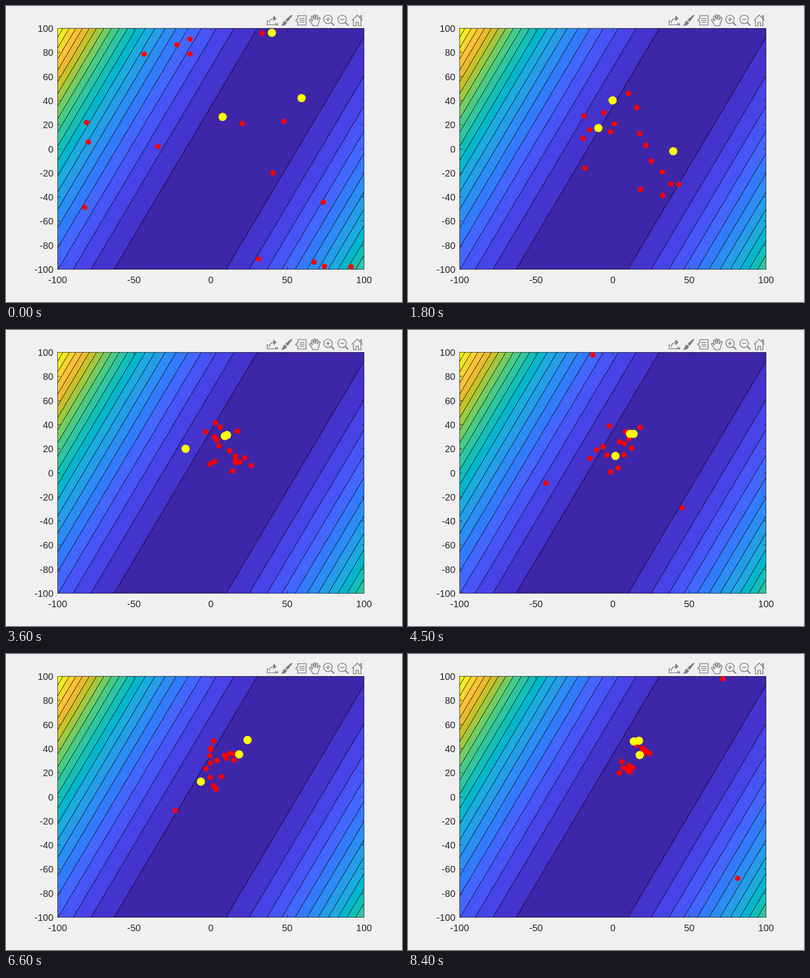
Recreate the animation shown at these times as an HTML page. Size 840 by 630 pixels, loop 8.7 s.

```html
<!DOCTYPE html>
<html lang="en">
<head>
<meta charset="utf-8">
<title>Swarm on a contour plot</title>
<style>
html, body { margin: 0; width: 100%; height: 100%; overflow: hidden; background: #f0f0f0; }
svg { display: block; width: 840px; height: 630px; }
text { font: 20px "Liberation Sans", Arial, sans-serif; fill: #262626; }
</style>
</head>
<body>
<svg id="stage" viewBox="0 0 840 630" xmlns="http://www.w3.org/2000/svg">
  <defs><clipPath id="plot"><rect x="109" y="47" width="651" height="514"/></clipPath></defs>
  <rect width="840" height="630" fill="#f0f0f0"/>
  <g id="bands" clip-path="url(#plot)" stroke="#000" stroke-width="1"></g>
  <g id="axes" fill="none" stroke="#262626" stroke-width="1"></g>
  <g id="labels"></g>
  <g id="tools" fill="none" stroke="#808080" stroke-width="1.7">
    <path d="M557 31.500H554V40H572V35.500M558.500 36C559 30 563 26.500 570 26.500"/>
    <path d="M567 20L574 26.500L567 32.500ZM571 41H577V35.500Z" fill="#808080" stroke="none"/>
    <path d="M605.500 18.500L607.500 20.500L597.500 34L592.500 29.500ZM591 31L596 35.500C595 40 590 42.500 583.500 42C587 39 587 33 591 31Z" fill="#808080" stroke="none"/>
    <path d="M619 20.500H636.500V40.500H619V34L614.500 30.500L619 27ZM622.500 26.500H633M622.500 30.500H633M622.500 34.500H633"/>
    <path d="M651 42C649 37.500 646 34 644 31C643 28.500 646 27.500 647.500 29.500L650 32.500L648 23C648 20.500 651 20.500 651.500 23L653 29V20.500C653 18 656 18 656 20.500V29L658 21C658.500 19 661.500 19.500 661 22L660 30L663 25C664.500 23 667 24.500 666 27L663 36L661.500 42Z"/>
    <g id="lens"><circle cx="683" cy="28.500" r="9"/><path d="M689.500 35L696 41.500" stroke-width="2.500"/><path d="M678.500 28.500H687.500"/></g>
    <path d="M683 24V33"/>
    <use href="#lens" x="30"/>
    <path d="M733.500 31L745 19.500L756.500 31M737 28.500V42H742.500V34.500H747.500V42H753V28.500M751.500 25.500V20.500H754V28"/>
  </g>
  <g id="dots"></g>
</svg>
<script>
const NS = "http://www.w3.org/2000/svg";
const STEP = 300, COUNT = 29, LAST = COUNT - 1;

function add(parent, tag, attrs, text) {
  const el = document.createElementNS(NS, tag);
  for (const k in attrs) el.setAttribute(k, attrs[k]);
  if (text !== undefined) el.textContent = text;
  document.getElementById(parent).appendChild(el);
  return el;
}

// Quadratic valley: each level lies at a distance proportional to sqrt(level)
const palette = ("#3e26a8 #4433cc #4743e7 #4755f6 #4367fd #347afd #2d8cf3 #259ce7 #1caadf #05b6ce #12beb9 " +
  "#2fc5a2 #48cb86 #71cd64 #9fc942 #c8c129 #eaba31 #fec13a #fad42e #f5e825 #f9fb15").split(" ");
const TOP = 652, LOW = 347.7;
for (let k = palette.length - 1; k >= 0; k--) {
  const half = 118.7 * Math.sqrt(k + 1);
  add("bands", "path", {
    d: `M${TOP - half} 47H${TOP + half}L${LOW + half} 561H${LOW - half}Z`,
    fill: palette[k]
  });
}

// Axes
const crisp = v => Math.floor(v) + 0.5;
add("axes", "rect", { x: 109.5, y: 47.5, width: 650, height: 513 });
for (let x = -100; x <= 100; x += 50) {
  const p = crisp(434 + 3.25 * x);
  add("axes", "path", { d: `M${p} 561v-6.500M${p} 47v6.500` });
  add("labels", "text", { x: p, y: 590, "text-anchor": "middle" }, x);
}
for (let y = -100; y <= 100; y += 20) {
  const p = crisp(304 - 2.565 * y);
  add("axes", "path", { d: `M109 ${p}h6.500M760 ${p}h-6.500` });
  add("labels", "text", { x: 100.5, y: p + 7.5, "text-anchor": "end" }, y);
}

// Key points of the three leaders: step, then x, y pairs
const keys = [
  [0, 564, 57, 627, 196, 459.5, 236],
  [4, 409, 175, 643, 357, 457, 244],
  [9, 443, 249.5, 464, 255.5, 313, 251],
  [15, 471, 221, 478.5, 221, 440, 268],
  [19, 488.5, 196.5, 506, 230.5, 395, 296],
  [24, 507.5, 161.5, 498, 211, 404.5, 259.5],
  [28, 490, 184.5, 491.5, 215, 479, 186]
];

// Where the followers begin
const start = [
  [543.5, 58], [390, 70.5], [362.5, 82.5], [390.5, 102], [293, 102.5], [171, 248],
  [174.5, 289.5], [322, 299], [501, 250], [589.5, 245.5], [566, 355.5], [167, 428.5],
  [673, 417.5], [535.5, 538.5], [653.5, 545], [675.5, 554], [732, 555.5]
];

// Seeded value in -1..1
function noise(n) {
  const s = Math.sin(n * 127.1 + 11.7) * 43758.5453;
  return 2 * (s - Math.floor(s)) - 1;
}

const clamp = (v, lo, hi) => Math.min(hi, Math.max(lo, v));

function leader(n, step) {
  let i = 0;
  while (i < keys.length - 2 && keys[i + 1][0] <= step) i++;
  const a = keys[i], b = keys[i + 1];
  const u = (step - a[0]) / (b[0] - a[0]);
  const wander = 14 * Math.sin(Math.PI * u);
  const at = j => a[j] + (b[j] - a[j]) * u + wander * noise(step * 61 + j);
  return [at(2 * n + 1), at(2 * n + 2)];
}

// Followers close in on a drifting centre, scatter along the valley, and now and then scout far off
function follower(n, step) {
  const u = step / LAST, seed = step * 97 + n * 5;
  const cx = 475 - 35 * Math.sin(Math.PI * u * u), cy = 283 - 56 * u;
  const pull = Math.exp(-step / 6), settle = 1 - pull;
  const scout = step > 3 && noise(seed) > 0.86;
  const wide = scout ? 260 : 0, size = 70 - 30 * u;
  const along = size * noise(seed + 1), across = 0.65 * size * noise(seed + 2);
  const dx = 0.51 * along + 0.86 * across + wide * noise(seed + 3);
  const dy = 0.51 * across - 0.86 * along + wide * noise(seed + 4);
  const [sx, sy] = start[n];
  return [
    clamp(cx + (sx - cx) * pull + dx * settle, 115, 754),
    clamp(cy + (sy - cy) * pull + dy * settle, 53, 555)
  ];
}

const red = start.map(() => add("dots", "circle", { r: 5.8, fill: "#f00" }));
const yellow = [0, 1, 2].map(() => add("dots", "circle", { r: 8.8, fill: "#ff0" }));

function place(dot, [x, y]) {
  dot.setAttribute("cx", x.toFixed(2));
  dot.setAttribute("cy", y.toFixed(2));
}

function draw(now) {
  const step = Math.floor(now / STEP) % COUNT;
  red.forEach((dot, n) => place(dot, follower(n, step)));
  yellow.forEach((dot, n) => place(dot, leader(n, step)));
}

function tick() {
  draw(performance.now());
  requestAnimationFrame(tick);
}
tick();
</script>
</body>
</html>
```
